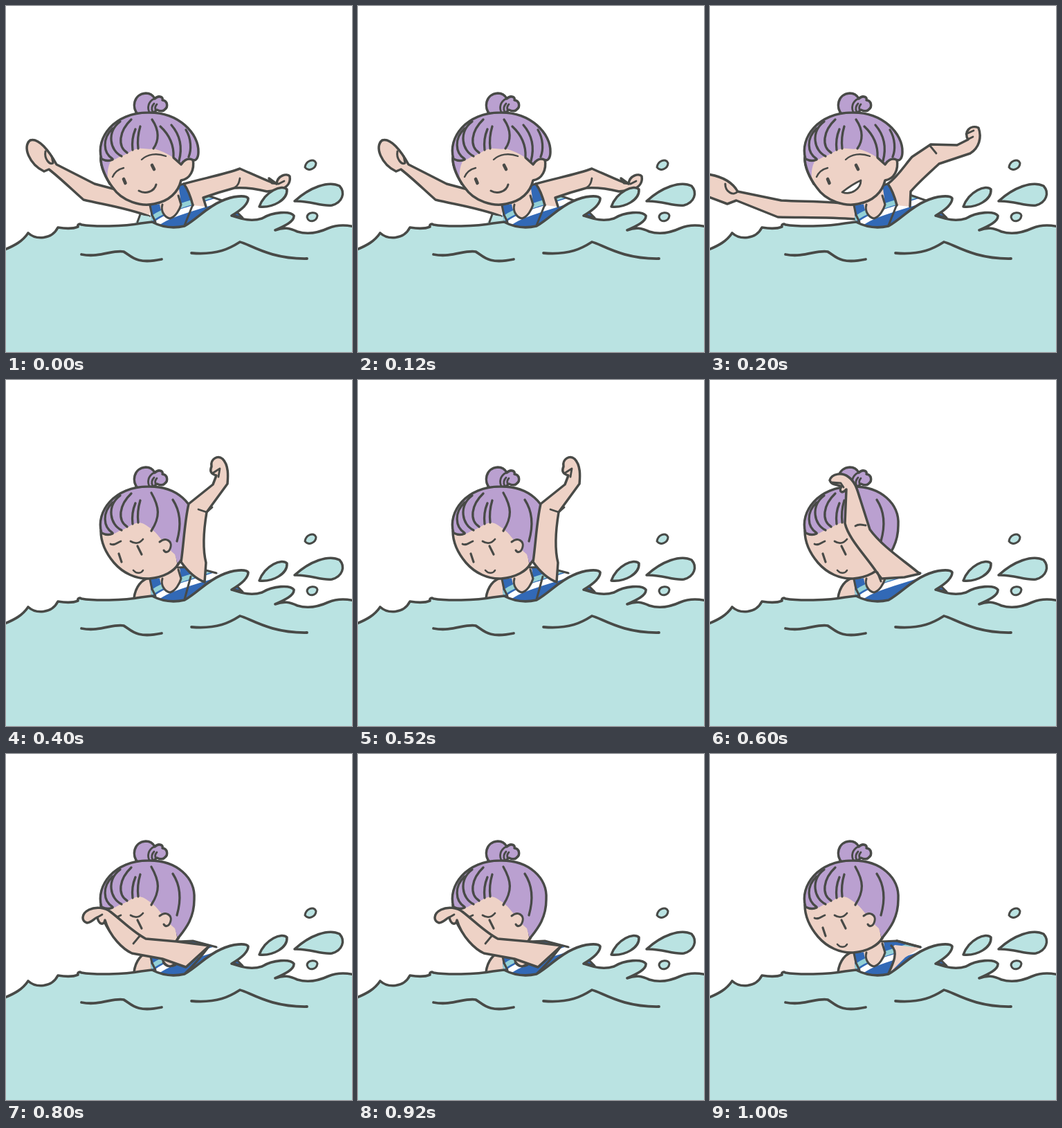
Write an HTML page with a canvas that moves like this. It is 500 px wide and 500 px high and loops after 1.2 s.

```html
<!DOCTYPE html>
<html lang="en">
<head>
<meta charset="utf-8">
<title>Swimmer</title>
<style>
html, body { margin: 0; width: 100%; height: 100%; overflow: hidden; background: #fff; }
canvas { display: block; width: 100vw; height: 100vh; object-fit: contain; }
</style>
</head>
<body>
<canvas id="stage" width="500" height="500"></canvas>
<script>
const ctx = document.getElementById('stage').getContext('2d');
const INK = '#484a47', SKIN = '#eed2c6', HAIR = '#baa0d0', WATER = '#bae3e2';
const BLUE = '#3269b6', AQUA = '#93d0d6', WHITE = '#fff';
const STEP = 200, POSES = 6;

function shape(d, fill, width = 3.5, color = INK) {
  const p = new Path2D(d);
  if (fill) { ctx.fillStyle = fill; ctx.fill(p); }
  if (width) { ctx.lineWidth = width; ctx.strokeStyle = color; ctx.stroke(p); }
}
const line = (d, width) => shape(d, null, width);

function suit(late) {
  const d = late
    ? 'M208 288L224 286L249 271L270 270L304 279L318 282L300 294L258 319L235 321L210 312Z'
    : 'M208 288L224 286L250 259L262 256L290 273L312 281L300 294L258 319L235 321L210 312Z';
  ctx.save();
  ctx.clip(new Path2D(d));
  ctx.fillStyle = BLUE;
  ctx.fillRect(200, 250, 130, 80);
  shape('M206 311C222 296 244 292 264 285L304 272', null, 7, AQUA);
  shape('M212 319C228 305 246 300 264 294L312 279', null, 8, WHITE);
  ctx.restore();
  line('M208 288L211 302L216 312', 3);
  shape('M222 286C224 300 230 307 237 307C246 304 253 291 252 278L250 264L226 270Z', SKIN, 0);
  line('M226 287C223 297 230 306 237 307C245 305 251 294 253 287L249 274', 3);
  line(late ? 'M248 271L270 270L304 279' : 'M250 259L257 257M286 272L312 281', 3);
}

function bun() {
  shape('M191 157C181 148 184 127 202 126C209 126 213 130 215 134C221 128 228 132 226 136C234 137 234 146 230 149C227 153 222 152 218 150L210 157Z', HAIR);
  line('M214 134C206 138 203 147 208 155M214 141C210 145 210 149 212 153M218 142C215 145 215 149 217 151', 2.8);
}

function locks() {
  line('M154 177C139 191 140 212 154 221M165 167C145 182 150 209 167 217M181 164C163 181 161 203 175 212M187 178C182 190 182 200 183 208M194 174C190 187 190 197 191 206', 3.3);
}

function headUp(grin) {
  bun();
  shape('M137 218C136 232 144 249 154 262C168 283 196 290 214 286C236 282 249 269 253 252C266 250 273 237 270 221L245 190L150 200Z', SKIN);
  shape('M138 221C138 231 142 240 147 248C146 238 148 230 153 221Z', HAIR, 0);
  line('M137 220C137 232 143 245 150 257');
  shape('M138 221C129 190 157 154 205 154C250 153 279 185 278 211C278 220 274 225 269 222C262 219 256 224 253 229C250 226 247 222 243 220C233 213 224 209 213 206C206 208 199 205 191 206C181 208 176 214 167 217C160 219 158 223 154 222C148 225 142 223 138 221Z', HAIR, 0);
  line('M154 222C148 225 142 223 138 221C129 190 157 154 205 154C250 153 279 185 278 211C278 220 274 225 269 222C262 219 256 224 253 229L243 220');
  locks();
  line('M211 164C222 180 221 195 213 206M223 174C237 187 243 202 242 219M239 172C252 187 255 205 250 224M260 179C268 192 268 208 264 218', 3.3);
  line('M154 247C157 240 162 236 170 234M196 222C204 214 218 212 231 217', 2.4);
  line('M170 250L172.500 256M211 230L214 236', 4.6);
  if (grin) shape('M191 269C200 262 209 256 218 252C218 264 204 274 191 269Z', WHITE, 2.8);
  else line('M192 267C201 272 214 269 217 258', 3);
}

function headDown() {
  bun();
  shape('M137 218C137 235 145 251 156 264C169 279 188 288 207 287C229 285 243 276 249 266L240 210L160 195Z', SKIN);
  shape('M138 221C129 190 157 154 205 154C247 153 274 179 272 210C273 238 258 255 248 266L244 252C232 242 222 225 211 216C203 210 198 206 191 206C181 208 176 214 167 217C160 219 158 223 154 222C148 225 142 223 138 221Z', HAIR, 0);
  shape('M222 232C230 224 242 235 237 244C235 251 229 251 227 246L231 254L243 254L214 218Z', SKIN, 0);
  line('M248 267C259 253 272 238 272 210C274 179 247 153 205 154C157 154 129 190 138 221C142 223 148 225 154 222');
  locks();
  line('M210 163C222 184 223 198 210 218M241 173C253 191 253 212 247 233', 3.3);
  line('M222 234C232 226 240 234 238 241C236 250 230 250 228 246', 3);
  line('M151 237C156 240 161 235 166 233M180 233C188 238 194 235 198 230', 2.8);
  line('M163 251L167 263M190 240L196 252', 3.2);
  line('M184 275C189 281 196 279 198 275', 2.6);
}

function reachHigh() {
  shape('M210 287L158 265L128 257L73 229C62 209 47 190 35 194C23 203 34 229 55 239L62 236C80 250 98 268 112 280C140 287 172 291 207 304', SKIN);
  line('M57 210C55 221 63 230 68 227L66 217', 3);
  shape('M184 318L194 302L207 304L214 318Z', WATER, 0);
  line('M194 301L190 312', 3);
}

function reachLow() {
  shape('M208 287C174 282 137 283 103 281L40 268C32 254 17 246 -4 243L-4 275L25 286L38 281L98 305C134 306 170 305 210 308', SKIN);
  line('M22 257C22 269 34 275 40 268', 3);
}

function shoulder() {
  shape('M185 315C187 300 195 287 211 285L213 316', SKIN);
}

// Trailing arm in each pose, from stretched back to dipped in the water.
const backArm = [
  () => {
    shape('M270 288C267 276 263 265 257 257C285 249 317 243 338 235C354 242 369 249 384 255L380 249L391 257C392 245 406 241 410 246C412 258 404 263 394 266L377 268C361 264 346 262 330 263C315 267 302 271 285 277L289 290', SKIN);
    line('M331 262C336 259 337 254 338 249M384 256L394 257L402 253', 2.8);
    line('M270 287L258 317', 3);
  },
  () => {
    shape('M270 288C267 276 263 265 257 257C272 246 282 229 292 218L319 200L357 201L373 193C366 182 376 171 388 176C393 190 389 205 376 213L331 228C317 241 302 254 290 268L289 290', SKIN);
    line('M318 202L327 213M370 185L381 180M372 193L380 189', 2.8);
    line('M270 287L258 317', 3);
  },
  () => {
    shape('M287 292C276 288 263 277 253 263C257 235 258 205 264 179L299 151L304 138C294 135 295 130 297 125C295 114 306 108 313 114C322 123 321 139 320 150L290 191C286 215 284 244 289 264L287 292Z', SKIN);
    line('M278 187L290 191L298 184M298 135L309 128L307 140', 2.8);
    line('M267 284L258 317', 3);
  },
  () => {
    shape('M241 278C224 253 200 229 195 207L197 158C190 166 186 160 190 154C183 150 176 153 173 145C176 135 191 133 200 140C211 148 213 160 217 172L231 216C249 241 282 262 303 280L281 285L248 287Z', SKIN);
    line('M210 211C215 208 219 209 225 210M176 148L189 149L193 155', 2.8);
    line('M242 278L247 291', 3);
  },
  () => {
    shape('M294 277L247 271L202 267C183 257 168 241 151 228C143 222 130 220 120 225C108 231 109 242 117 244C124 243 127 238 132 236C134 247 142 248 143 240C150 264 169 282 182 288L226 296L260 308Z', SKIN);
    line('M184 274L194 262M132 236L139 232M227 301C231 308 239 308 245 305', 2.8);
    line('M294 277C281 294 270 307 258 318');
  },
  () => {
    shape('M267 276L304 280L282 294L259 317C264 306 270 292 265 278Z', SKIN, 0);
    line('M270 270L304 279M262 277C273 286 264 304 258 317', 3.4);
  }
];

function sea() {
  shape('M326 302L331 295L342 306Z', BLUE, 3);
  shape('M-4 353C13 346 24 340 32 328C43 338 66 338 75 320C87 322 97 322 104 319C103 316 106 314 109 316C126 319 170 319 195 314L211 312C228 321 245 321 258 318C277 307 290 291 311 282C328 274 347 273 350 278C350 287 338 296 326 303C342 308 354 312 370 307C386 297 411 296 416 303C417 312 400 319 389 324C402 319 410 321 421 326C437 331 453 327 466 321C478 316 490 316 504 319L504 504L-4 504Z', WATER, 3.6);
  shape('M366 290C374 268 399 257 406 265C407 280 386 292 366 290Z', WATER);
  shape('M417 282C439 262 466 252 482 260C491 270 486 284 471 288C455 290 440 281 417 282Z', WATER);
  shape('M432 233C433 224 445 219 448 227C448 235 437 240 432 233Z', WATER, 3);
  shape('M435 305C436 297 449 297 450 303C449 312 437 314 435 305Z', WATER, 3);
  line('M109 359C136 364 154 352 170 355C181 361 187 374 225 366M268 357C306 360 324 350 338 341C352 344 381 366 435 365', 3.8);
}

function draw(pose) {
  const late = pose > 1;
  ctx.fillStyle = WHITE;
  ctx.fillRect(0, 0, 500, 500);
  if (late) shoulder();
  else if (pose) reachLow();
  else reachHigh();
  suit(late);
  if (late) headDown();
  else headUp(pose === 1);
  backArm[pose]();
  sea();
}

ctx.lineCap = ctx.lineJoin = 'round';
function tick() {
  draw(Math.floor(performance.now() / STEP) % POSES);
  requestAnimationFrame(tick);
}
tick();
</script>
</body>
</html>
```
